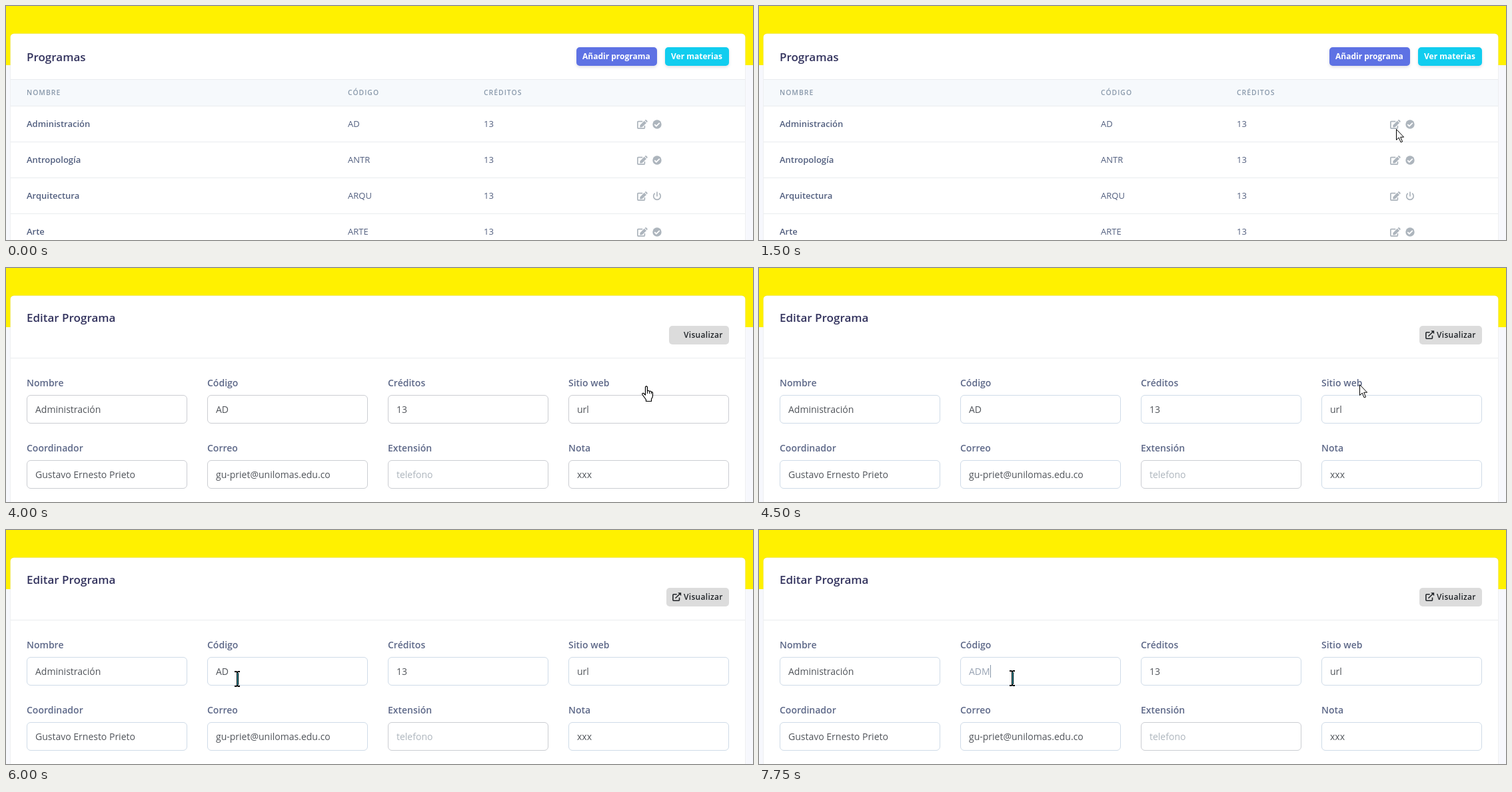
An HTML page that plays this animation: 1121 by 352 pixels, repeating every 8 s.

```html
<!DOCTYPE html>
<html lang="es">
<head>
<meta charset="utf-8">
<title>Programas</title>
<style>
  html, body { margin: 0; width: 100%; height: 100%; overflow: hidden; }
  svg { display: block; width: 1121px; height: 352px; font: 14px "Open Sans", sans-serif; }
  .title { font-size: 17px; font-weight: 600; fill: #32325d; }
  .head { font-size: 10.4px; font-weight: 600; letter-spacing: 1px; fill: #8898aa; }
  .cell { font-size: 13px; fill: #525f7f; }
  .name { font-size: 13px; font-weight: 600; fill: #525f7f; }
  .label { font-weight: 600; fill: #5d6888; }
  .value { fill: #50545a; }
  .hint { fill: #adb5bd; }
  .btn { font-size: 12px; font-weight: 600; letter-spacing: .025em; }
  .btn.strong { font-weight: 700; letter-spacing: 0; }
  .raised { filter: drop-shadow(0 2px 2px rgba(50, 50, 93, .16)); }
  .field { fill: #fff; stroke: #cbcdd2; }
  .tinted .field:not(.plain) { stroke: #cfdbe8; }
  .icon { fill: #adb5bd; stroke: none; }
  .line { fill: none; stroke: #adb5bd; stroke-width: 1.7; }
  .hover .icon { fill: #666c78; }
  .hover .line { stroke: #666c78; }
  .pointer { fill: #fff; stroke: #000; stroke-linejoin: round; }
</style>
</head>
<body>
<svg id="stage" viewBox="0 0 1121 352"></svg>
<script>
const stage = document.getElementById('stage');
const $ = id => document.getElementById(id);
const text = (x, y, cls, str, extra = '') => `<text x="${x}" y="${y}" class="${cls}" ${extra}>${str}</text>`;
const rect = (x, y, w, h, attrs) => `<rect x="${x}" y="${y}" width="${w}" height="${h}" ${attrs}/>`;
const rule = y => rect(7, y, 1102, 1, 'fill="#e9ecef"');
const group = (x, y, body, attrs = '') => `<g transform="translate(${x} ${y})" ${attrs}>${body}</g>`;

const edit = `<path class="line" d="M8.3 2.6H1.9Q.9 2.6 .9 3.6V12.1Q.9 13.1 1.9 13.1H10.4Q11.4 13.1 11.4 12.1V9"/>
  <path class="icon" d="M4.5 8.2L10.9 1.8L14 4.9L7.6 11.3L4.2 11.6ZM11.6 1.1L12.5 .3Q13.1-.2 13.7 .3L15.5 2.1Q16 2.7 15.5 3.3L14.7 4.2Z"/>`;
const check = `<circle class="icon" r="6.7"/>
  <path d="M-3.7 .1L-1.1 2.7L3.8-2.2" fill="none" stroke="#fff" stroke-width="1.8"/>`;
const power = `<path class="line" d="M-3.2-4.2A5.3 5.3 0 1 0 3.2-4.2M0-6.6V.6"/>`;
const openLink = `<path d="M6.7 2.7H1.9Q.9 2.7 .9 3.7V11.3Q.9 12.3 1.9 12.3H9.5Q10.5 12.3 10.5 11.3V7.6M4.4 8.8L11 2.2"
  fill="none" stroke="#212529" stroke-width="1.6"/><path d="M8.2 .3H13.2V5.3Z" fill="#212529"/>`;

const button = (x, w, fill, label) =>
  rect(x, 62, w, 28, `rx="5" fill="${fill}" class="raised"`) + text(x + 9, 80, 'btn strong', label, 'fill="#fff"');

const row = ([name, code, off], i) => {
  const y = 54 * i;
  return text(31, 182 + y, 'name', name) + text(513, 182 + y, 'cell', code) + text(717, 182 + y, 'cell', '13') +
    group(947, 171 + y, edit, i ? '' : 'id="firstEdit"') +
    group(977, 178 + y, off ? power : check) + rule(204 + y);
};

const field = ([label, value, hint], i) => {
  const x = 31 + 271 * (i % 4), y = i < 4 ? 0 : 98;
  return text(x, 178 + y, 'label', label) +
    rect(x + .5, 191.5 + y, 240, 42, `rx="5.5" class="field ${hint ? 'plain' : ''}"`) +
    text(x + 13, 218 + y, hint ? 'hint' : 'value', value, i === 1 ? 'id="code"' : '');
};

const list = text(31, 83, 'title', 'Programas') +
  button(856, 121, '#5e72e4', 'Añadir programa') + button(989, 96, '#11cdef', 'Ver materias') +
  rect(7, 110, 1102, 41, 'fill="#f6f9fc"') + rule(110) + rule(150) +
  text(31, 134, 'head', 'NOMBRE') + text(513, 134, 'head', 'CÓDIGO') + text(717, 134, 'head', 'CRÉDITOS') +
  [['Administración', 'AD'], ['Antropología', 'ANTR'], ['Arquitectura', 'ARQU', true], ['Arte', 'ARTE']].map(row).join('') +
  `<g id="tip">${rect(895, 132, 123, 29, 'rx="5" fill="#191919"')}
    <path d="M950 161H963L956.5 166.5Z" fill="#191919"/>
    ${text(956.5, 152, '', 'Editar programa', 'fill="#fff" text-anchor="middle"')}</g>`;

const form = text(31, 81, 'title', 'Editar Programa') + rule(135) +
  '<rect id="view" y="87" height="28" rx="5" fill="#dcdcdc"/>' +
  group(1000, 94, openLink, 'id="viewIcon"') + text(1017, 105, 'btn', 'Visualizar', 'fill="#212529"') +
  [['Nombre', 'Administración'], ['Código', 'AD'], ['Créditos', '13'], ['Sitio web', 'url'],
   ['Coordinador', 'Gustavo Ernesto Prieto'], ['Correo', 'gu-priet@unilomas.edu.co'],
   ['Extensión', 'telefono', true], ['Nota', 'xxx']].map(field).join('') +
  rect(0, 203, 1, 19, 'id="caret" fill="#8898aa"');

const pointers = {
  arrow: '<path class="pointer" d="M.5 .5V16.5L4.2 13L7.2 20L9.6 19L6.7 12.2H11.6Z"/>',
  hand: `<path class="pointer" stroke-width="1.2" d="M5.5 14V2Q7-.4 8.5 2V8Q10.6 6.7 11.5 8.6Q13.6 7.4 14.3 9.5Q16.5 9 16.5 11.2V15.5
    Q16.5 17.5 14.5 20V23.5H6.5V21L1 13.5Q.2 11 2.6 11.3Z"/>
    <path d="M8.5 8V12M11.5 8.6V12M14.3 9.5V12.5" stroke="#000"/>`,
  beam: `<path d="M-4-12H-1L0-11L1-12H4V-10H1V10H4V12H1L0 11L-1 12H-4V10H-1V-10H-4Z"/>
    ${rect(0, -9, 2, 18, 'fill="#2aa9b8"')}${rect(1.2, -9, 1, 18, 'fill="#000"')}`
};

// [start in ms, pointer, x, y]
const moves = [
  [500, 'arrow', 671, 235], [750, 'arrow', 856, 164], [1000, 'arrow', 917, 170],
  [1250, 'arrow', 940, 178], [1500, 'arrow', 956, 185], [1750, 'hand', 954, 177],
  [4500, 'arrow', 901, 175], [4750, 'beam', 671, 204], [5000, 'beam', 400, 204],
  [5250, 'arrow', 282, 199], [5500, 'beam', 228, 227], [5750, 'beam', 268, 225],
  [6000, 'beam', 347, 224], [6250, 'beam', 380, 223]
];

stage.innerHTML = rect(0, 0, 1121, 352, 'fill="#f7f8fd"') + rect(0, 0, 1121, 89, 'fill="#fff100"') +
  rect(6.5, 41.5, 1103, 340, 'rx="5.5" fill="#fff" stroke="#000" stroke-opacity=".05"') +
  `<g id="list">${list}</g><g id="form">${form}</g>` +
  Object.keys(pointers).map(k => `<g id="${k}">${pointers[k]}</g>`).join('');

const show = (id, on) => { $(id).style.display = on ? '' : 'none'; };

function draw(t) {
  const editing = t >= 4000, loaded = t >= 4500;
  show('list', !editing);
  show('form', editing);
  show('tip', t >= 1750);
  $('firstEdit').classList.toggle('hover', t >= 1750);

  $('form').classList.toggle('tinted', loaded);
  show('viewIcon', loaded);
  $('view').setAttribute('x', loaded ? 991 : 995);
  $('view').setAttribute('width', loaded ? 94 : 90);

  const code = $('code');
  code.textContent = t >= 7750 ? 'ADM' : 'AD';
  code.style.fill = t >= 6500 ? '#98a3b3' : '';
  show('caret', t >= 6750 && t < 7000 || t >= 7500);
  if (editing) $('caret').setAttribute('x', Math.ceil(315 + code.getComputedTextLength()));

  const move = moves.filter(m => m[0] <= t).pop() || [];
  for (const kind in pointers) show(kind, kind === move[1]);
  if (move[1]) $(move[1]).setAttribute('transform', `translate(${move[2]} ${move[3]})`);
}

const start = performance.now();
function tick() {
  draw((performance.now() - start) % 8000);
  requestAnimationFrame(tick);
}
tick();
</script>
</body>
</html>
```
